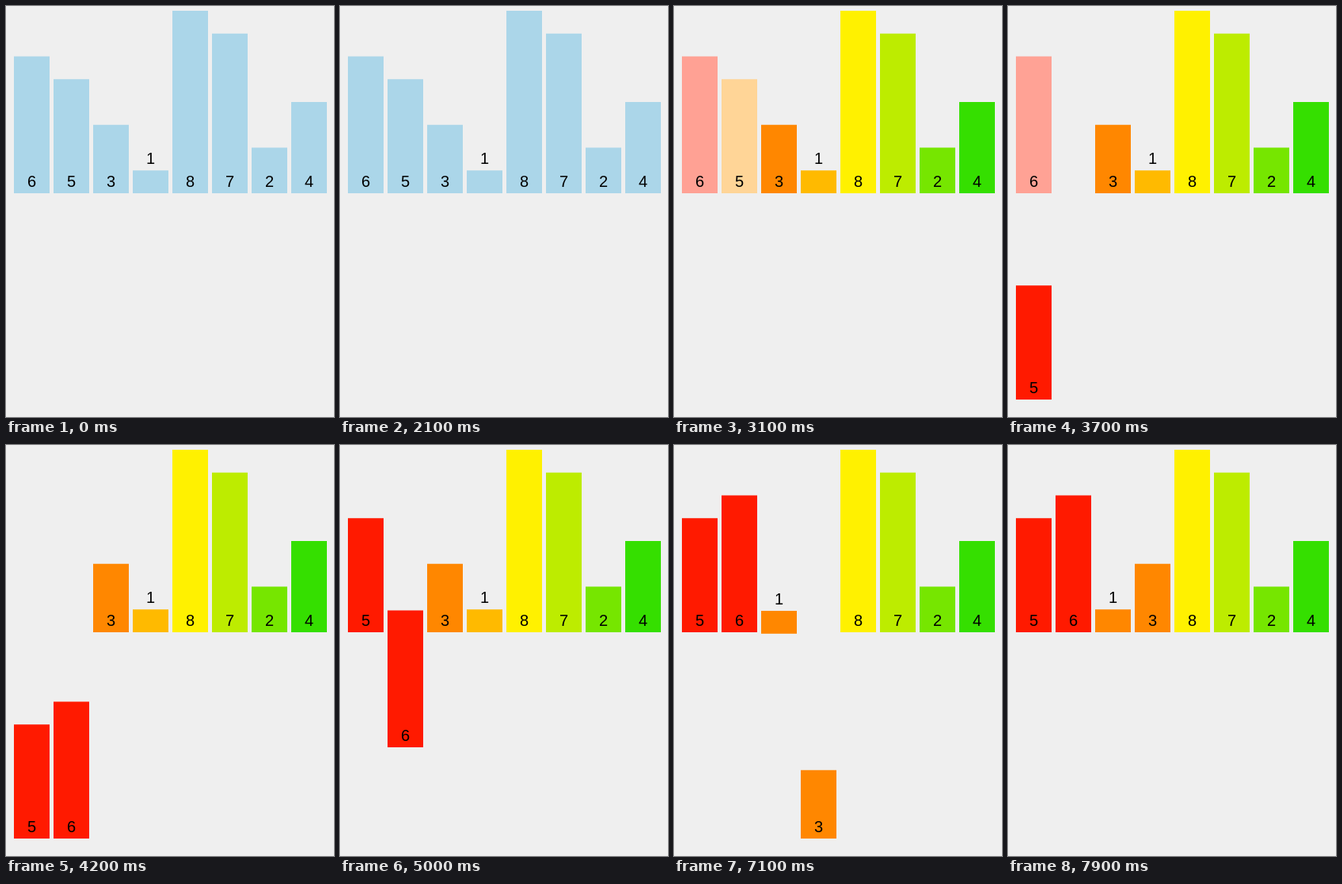
Recreate the animation shown at these times as an HTML page. Size 414 by 518 pixels, loop 8000 ms.

```html
<!DOCTYPE html>
<html lang="en">
<head>
<meta charset="utf-8">
<title>Merge sort</title>
<style>
  html, body { margin: 0; width: 100%; height: 100%; overflow: hidden; background: #efefef; }
  svg { display: block; width: 414px; height: 518px; }
  text { font: 20px "Liberation Sans", Arial, Helvetica, sans-serif; text-anchor: middle; fill: #000; }
</style>
</head>
<body>
<svg id="stage" viewBox="0 0 414 518"><g id="bars"></g><g id="labels"></g></svg>
<script>
const LOOP = 8000, FIRST = 2381, STEP = 500, EASE_TIME = 250;
const UNIT = 28.75, WIDTH = 45, PITCH = 50, LEFT = 10, TOP_ROW = 236, LOW_ROW = 496;
const values = [6, 5, 3, 1, 8, 7, 2, 4];

const rgb = hex => [1, 3, 5].map(i => parseInt(hex.slice(i, i + 2), 16));
const BLUE = rgb('#abd6e9');
const GROUP = ['#ff1a00', '#ff5300', '#ff8700', '#ffba00', '#fff100', '#bdec00', '#76e600', '#35df00'].map(rgb);
const LIGHT = ['#ffa295', '#ffd698', '#fff894', '#cdf598'].map(rgb);

const low = (col, fill) => ({ col, base: LOW_ROW, fill });
const up = { base: TOP_ROW };

// Each step maps a bar value to the properties it takes on.
const steps = [
  Object.fromEntries(values.map((v, i) => [v, { fill: GROUP[i] }])),
  { 6: { fill: LIGHT[0] }, 5: { fill: LIGHT[1] } },
  { 5: low(0, GROUP[0]) },
  { 6: low(1, GROUP[0]) },
  { 5: up },
  { 6: up },
  { 3: { fill: LIGHT[2] }, 1: { fill: LIGHT[3] } },
  { 1: low(2, GROUP[2]) },
  { 3: low(3, GROUP[2]) },
  { 1: up },
  { 3: up }
];

function add(parent, tag, attrs) {
  const el = document.createElementNS('http://www.w3.org/2000/svg', tag);
  set(el, attrs);
  return document.getElementById(parent).appendChild(el);
}

function set(el, attrs) {
  for (const name in attrs) el.setAttribute(name, attrs[name]);
}

const items = values.map((value, i) => {
  const bar = add('bars', 'rect', { width: WIDTH, height: value * UNIT });
  const label = add('labels', 'text', {});
  label.textContent = value;
  return { value, bar, label, start: { col: i, base: TOP_ROW, fill: BLUE } };
});

const mix = (a, b, p) => a + (b - a) * p;
const cubicInOut = t => t < 0.5 ? 4 * t ** 3 : 1 - 4 * (1 - t) ** 3;

function stateAt(item, time) {
  let state = item.start;
  steps.forEach((step, k) => {
    const t = (time - FIRST - k * STEP) / EASE_TIME;
    if (t <= 0 || !step[item.value]) return;
    const next = { ...state, ...step[item.value] };
    const p = cubicInOut(Math.min(t, 1));
    state = {
      col: mix(state.col, next.col, p),
      base: mix(state.base, next.base, p),
      fill: state.fill.map((c, i) => mix(c, next.fill[i], p))
    };
  });
  return state;
}

function draw(time) {
  for (const item of items) {
    const { col, base, fill } = stateAt(item, time);
    const x = LEFT + col * PITCH;
    const lift = item.value === 1 ? UNIT : 0;
    set(item.bar, { x, y: base - item.value * UNIT, fill: `rgb(${fill.map(Math.round)})` });
    set(item.label, { x: x + WIDTH / 2, y: base - lift - 8 });
  }
}

const origin = performance.now();
function tick() {
  draw((performance.now() - origin) % LOOP);
  requestAnimationFrame(tick);
}
draw(0);
requestAnimationFrame(tick);
</script>
</body>
</html>
```
